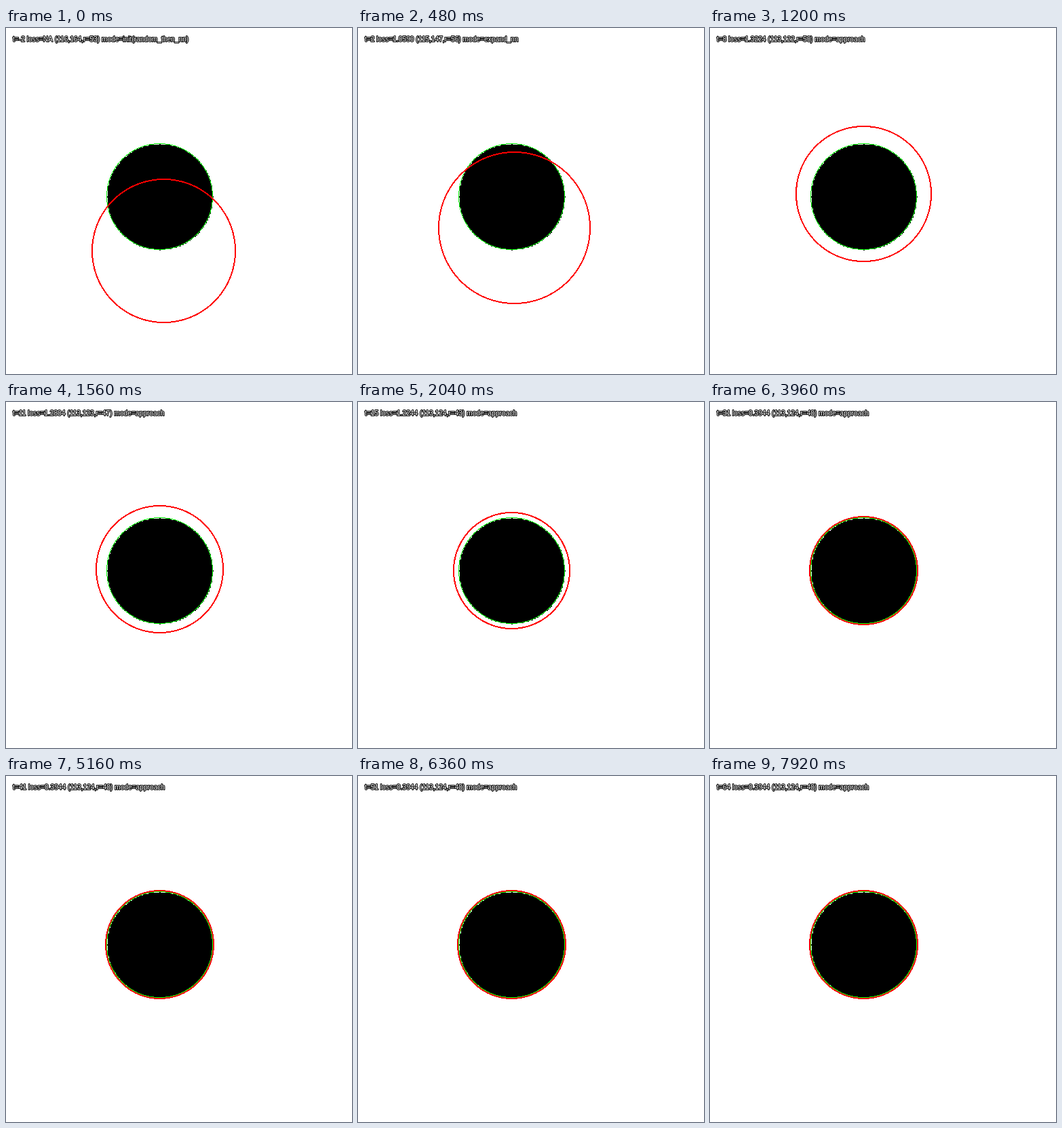
Write an HTML page with a canvas that moves like this. It is 510x510 px and loops after 8 s.

```html
<!DOCTYPE html>
<html lang="en">
<head>
<meta charset="utf-8">
<title>Circle fitting</title>
<style>
  html, body { margin: 0; width: 100%; height: 100%; overflow: hidden; background: #fff; }
  canvas { display: block; }
</style>
</head>
<body>
<canvas id="stage" width="510" height="510"></canvas>
<script>
const ctx = document.getElementById('stage').getContext('2d');
const LOOP_MS = 8000, STEP_MS = 120, SCALE = 2;
const target = { x: 113, y: 124, r: 39 };

// Centre of the moving circle at each step until it settles
const pathX = [116, 116, 116, 115, 115, 114, 114, 113];
const pathY = [164, 164, 159, 153, 147, 141, 134, 128, 125, 123, 122, 122, 123, 123, 124];
const lossKeys = [[2, 0.9412], [4, 1.0590], [10, 1.3224], [17, 1.2244], [20, 0.3944]];

const at = (list, i) => list[Math.min(i, list.length - 1)];

function lossAt(step) {
  const next = lossKeys.findIndex(key => key[0] >= step);
  if (next < 0) return at(lossKeys, Infinity)[1];
  if (next === 0) return lossKeys[0][1];
  const [s0, v0] = lossKeys[next - 1], [s1, v1] = lossKeys[next];
  return v0 + (v1 - v0) * (step - s0) / (s1 - s0);
}

function radiusAt(step) {
  return step <= 4 ? 53 + Math.max(0, step - 1) : Math.max(40, 60 - step);
}

// Fills every square cell whose distance from the centre lies in (inner, outer]
function cells(cx, cy, inner, outer, size, color) {
  ctx.fillStyle = color;
  const reach = Math.ceil(outer);
  for (let dy = -reach; dy <= reach; dy++) {
    for (let dx = -reach; dx <= reach; dx++) {
      const d = Math.hypot(dx, dy);
      if (d > inner && d <= outer) ctx.fillRect((cx + dx) * size, (cy + dy) * size, size, size);
    }
  }
}

function ring({ x, y, r }, width, color) {
  const outer = r * SCALE + 0.5;
  cells(x * SCALE, y * SCALE, outer - width, outer, 1, color);
}

function label(text) {
  ctx.font = '10.2px "Liberation Sans", Arial, sans-serif';
  ctx.lineJoin = 'round';
  ctx.lineWidth = 2;
  ctx.strokeStyle = '#000';
  ctx.fillStyle = '#fff';
  ctx.strokeText(text, 10, 20);
  ctx.fillText(text, 10, 20);
}

function draw(step) {
  const guess = { x: at(pathX, step), y: at(pathY, step), r: radiusAt(step) };
  const init = step < 2;
  const mode = init ? 'init(random_then_nn)' : step <= 4 ? 'expand_nn' : 'approach';
  const loss = init ? 'NA' : lossAt(step).toFixed(4);

  ctx.fillStyle = '#fff';
  ctx.fillRect(0, 0, 510, 510);
  cells(target.x, target.y, -1, target.r, SCALE, '#000');
  ring(target, 1, '#0f0');
  ring(guess, 2, '#f00');
  label(`t=${step - 2} loss=${loss} (${guess.x},${guess.y},r=${guess.r}) mode=${mode}`);
}

const start = performance.now();
let shown = -1;
function tick() {
  const step = Math.floor((performance.now() - start) % LOOP_MS / STEP_MS);
  if (step !== shown) draw(shown = step);
  requestAnimationFrame(tick);
}
tick();
</script>
</body>
</html>
```
